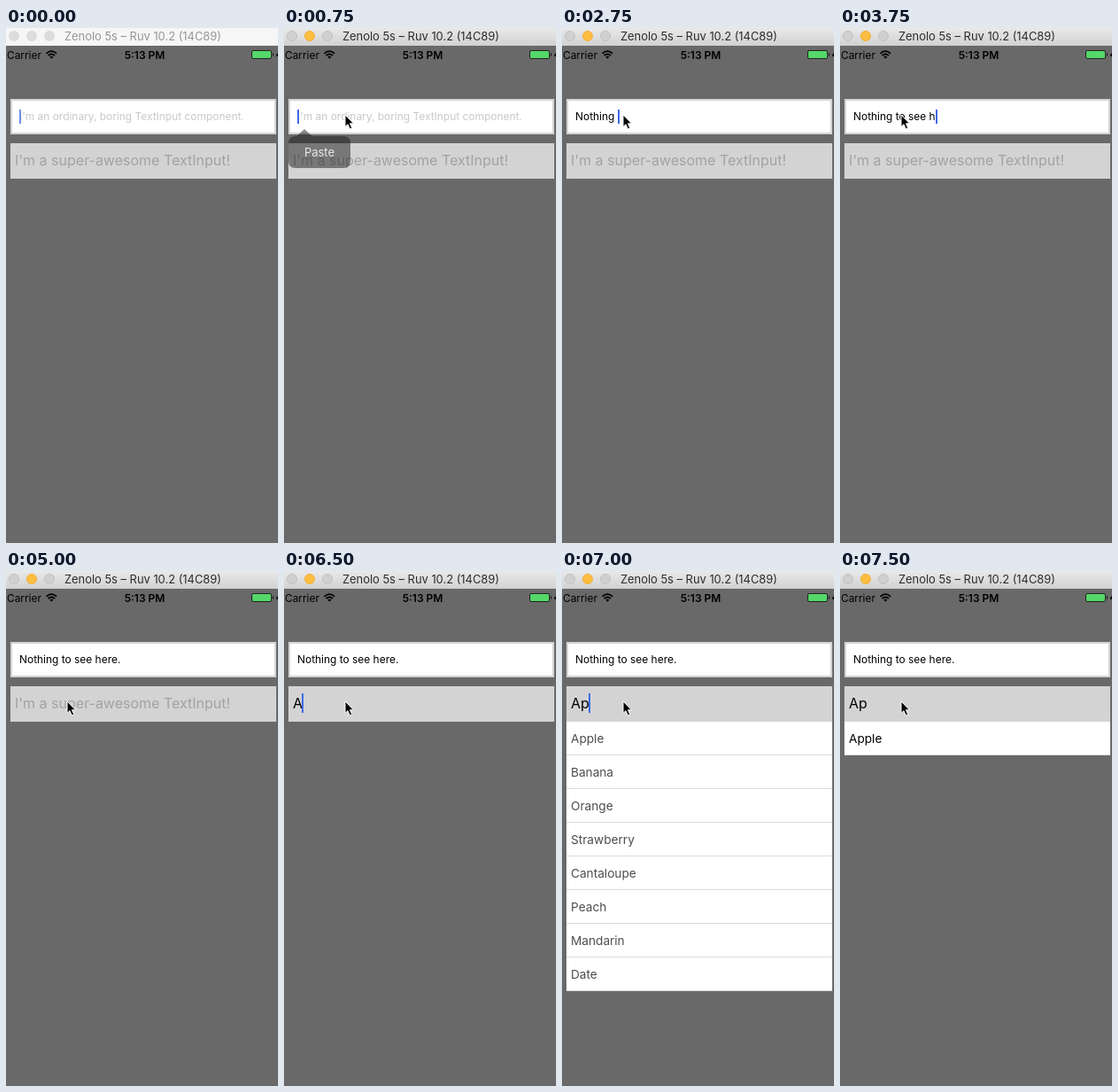
Write an HTML page that moves like this. It is 307 px wide and 581 px high and loops after 8000 ms.

```html
<!DOCTYPE html>
<html lang="en">
<head>
<meta charset="utf-8">
<title>Text inputs</title>
<style>
  html, body { margin: 0; width: 100%; height: 100%; overflow: hidden; }
  body { font-family: Inter, "Open Sans", sans-serif; color: #000; }
  #stage { position: relative; width: 307px; height: 581px; overflow: hidden; background: #696969; }
  #stage > * { position: absolute; }
  .bar { left: 0; top: 0; width: 307px; height: 20px; background: #f6f6f6; color: #969696; }
  .bar b { position: absolute; left: 0; width: 309px; text-align: center; font: 400 12.9px/19px Inter, sans-serif; }
  .bar i { position: absolute; top: 3px; width: 12px; height: 12px; border-radius: 50%; background: #dcdcdc; box-sizing: border-box; }
  .bar.active { background: linear-gradient(#e9e9e9, #d1d1d1); color: #2c2c2c; }
  .active i { background: #d0d0d0; border: 1px solid #c2c2c2; }
  .active i:nth-child(2) { background: #fdbd3f; border-color: #f0b03a; }
  .field { left: 5px; width: 300px; height: 40px; box-sizing: border-box; white-space: pre; }
  #one { top: 80px; background: #fff; border: 2px solid #d3d3d3; padding-left: 8px; font-size: 11.95px; line-height: 36px; }
  #two { top: 130px; background: #d3d3d3; padding-left: 5px; font-size: 16px; line-height: 39px; }
  .hint { color: #c9c9cd; }
  #two .hint { color: #a2a2a5; }
  .caret { display: inline-block; position: relative; width: 0; }
  .caret::after { content: ""; position: absolute; left: 0; width: 2px; background: #4069e6; }
  #one .caret::after { top: -12px; height: 16px; }
  #two .caret::after { top: -17px; left: -1px; height: 22px; }
  #list { left: 5px; top: 170px; width: 300px; background: #fff; font-size: 13.65px; }
  #list div { height: 38px; line-height: 38px; padding-left: 5px; box-sizing: border-box; border-bottom: 1px solid #dcdcdc; }
  #menu { left: 5px; top: 114px; }
  svg { display: block; overflow: visible; }
</style>
</head>
<body>
<div id="stage">
  <div class="bar" id="bar"><i style="left:3px"></i><i style="left:23px"></i><i style="left:43px"></i><b>Zenolo 5s – Ruv 10.2 (14C89)</b></div>
  <svg width="307" height="581" style="left:0;top:0">
    <text x="1" y="35" font-size="11.9">Carrier</text>
    <text x="156.5" y="35" font-size="12" font-weight="600" text-anchor="middle">5:13 PM</text>
    <g fill="none" stroke="#000" stroke-width="1.8">
      <path d="M45.5 28.8Q51.3 23.4 57.1 28.8M47.6 31.2Q51.3 27.8 55 31.2"/>
    </g>
    <path d="M49.2 32.6Q51.3 30.9 53.4 32.6L51.3 34.8Z"/>
    <rect x="277.5" y="25.5" width="22" height="9" rx="1.5" fill="#55d769" stroke="#222"/>
    <path d="M301 28.5h1v3h-1zM305 30l2-2v4h-2z" fill="#111"/>
  </svg>
  <div class="field" id="one"></div>
  <div class="field" id="two"></div>
  <div id="list"></div>
  <svg id="menu" width="70" height="44">
    <path d="M8 8H9.5L18 0L26.5 8H62Q70 8 70 16V36Q70 44 62 44H8Q0 44 0 36V16Q0 8 8 8Z" fill="#1d1d1d"/>
    <text x="35" y="31" font-size="13" fill="#fff" text-anchor="middle">Paste</text>
  </svg>
  <svg id="mouse" width="12" height="18" style="left:68.5px">
    <path d="M0 0V13.4L3 10.7L5.3 16L7.8 14.9L5.5 9.8H9.5Z" stroke="#fff" stroke-width="1"/>
  </svg>
</div>
<script>
const $ = id => document.getElementById(id);
const LOOP = 8000;
const FRUIT = ["Apple", "Banana", "Orange", "Strawberry", "Cantaloupe", "Peach", "Mandarin", "Date"];
const LINE = "Nothing to see here.";
const HINTS = { one: "I'm an ordinary, boring TextInput component.", two: "I'm a super-awesome TextInput!" };

// Each step changes part of the state at its time in ms; caret, menu and ink are opacities.
const steps = [
  [0, { active: false, one: 0, two: "", focus: "one", caret: 0.75, menu: 0, mouse: 0, rows: 0, ink: 1 }],
  [250, { mouse: 98 }],
  [500, { active: true, caret: 0 }],
  [750, { caret: 1, menu: 0.5 }],
  [1000, { menu: 0.92 }],
  [1250, { caret: 0 }],
  [1500, { one: 1, caret: 1, menu: 0.3 }],
  [1750, { one: 3, menu: 0 }],
  [2250, { one: 5 }],
  [2500, { one: 7 }],
  [2750, { one: 8 }],
  [3000, { one: 10 }],
  [3250, { one: 12 }],
  [3500, { one: 14 }],
  [3750, { one: 16 }],
  [4000, { one: 18 }],
  [4250, { one: 20 }],
  [5000, { caret: 0, mouse: 147 }],
  [5500, { caret: 1 }],
  [5750, { focus: "two" }],
  [6000, { caret: 0 }],
  [6250, { caret: 1 }],
  [6500, { two: "A" }],
  [6750, { two: "Ap", rows: 8, ink: 0.3 }],
  [7000, { ink: 0.7 }],
  [7250, { rows: 1, ink: 1 }],
  [7500, { caret: 0 }]
];

function drawField(id, text, s) {
  const caret = s.focus === id ? `<span class="caret" style="opacity:${s.caret}"></span>` : "";
  $(id).innerHTML = text ? text + caret : `${caret}<span class="hint">${HINTS[id]}</span>`;
}

function draw(s) {
  $("bar").className = s.active ? "bar active" : "bar";
  drawField("one", LINE.slice(0, s.one), s);
  drawField("two", s.two, s);
  $("list").innerHTML = FRUIT.slice(0, s.rows).map(f => `<div>${f}</div>`).join("");
  $("list").style.color = `rgba(0,0,0,${s.ink})`;
  $("menu").style.opacity = s.menu;
  $("mouse").style.top = s.mouse + "px";
  $("mouse").style.display = s.mouse ? "block" : "none";
}

let shown = -1;
const start = performance.now();
function tick() {
  const t = (performance.now() - start) % LOOP;
  const past = steps.filter(([at]) => at <= t);
  if (past.length !== shown) {
    shown = past.length;
    draw(Object.assign({}, ...past.map(p => p[1])));
  }
  requestAnimationFrame(tick);
}
tick();
</script>
</body>
</html>
```
